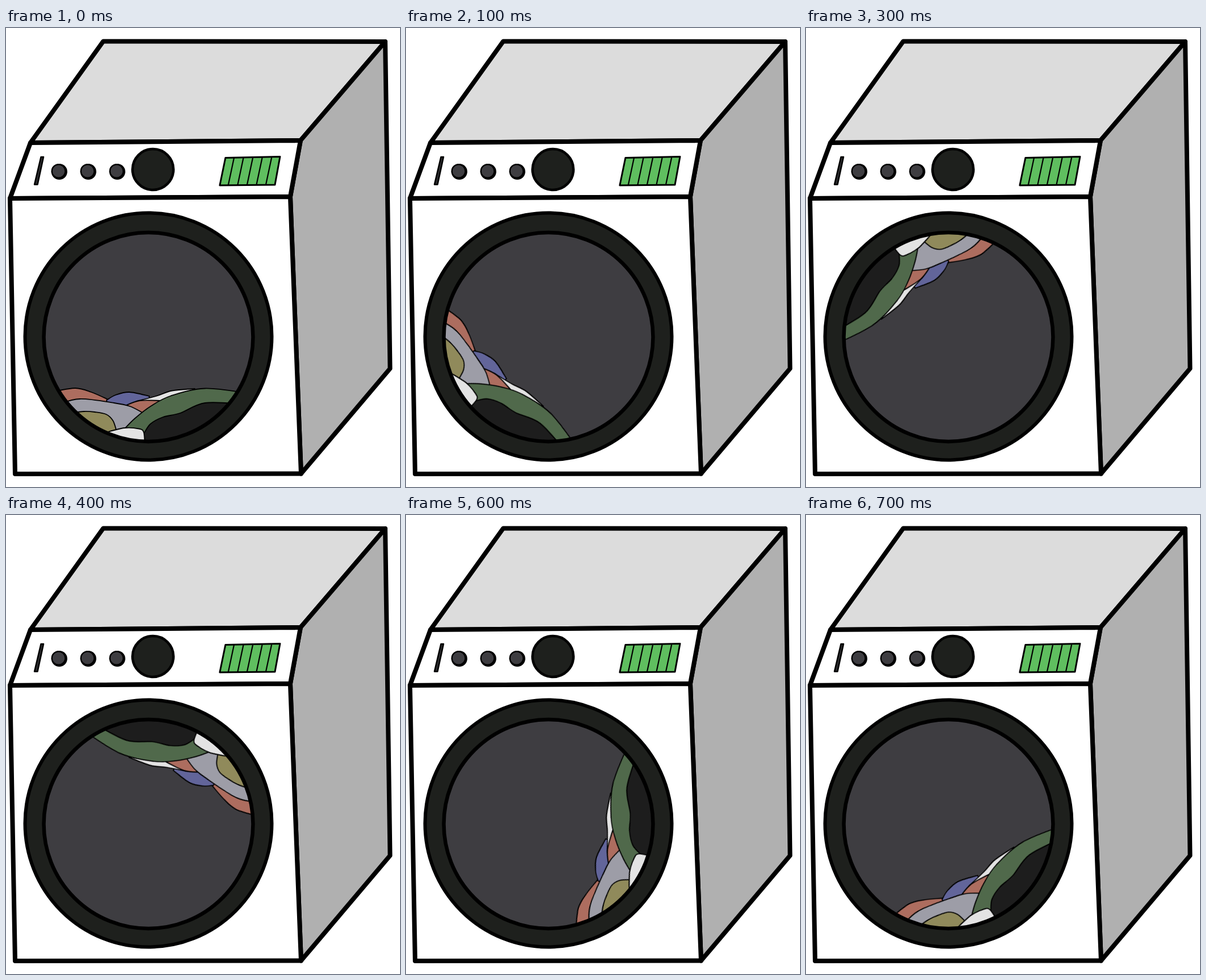
An HTML page for the animation above (0.8 s loop, 693 by 808 pixels).

```html
<!DOCTYPE html>
<html lang="en">
<head>
<meta charset="utf-8">
<title>Washing machine</title>
<style>
  html, body { margin: 0; width: 100%; height: 100%; overflow: hidden; background: #fff; }
  svg { display: block; width: 100%; height: 100%; }
  #pile { transform-origin: 250.5px 544px; }
</style>
</head>
<body>
<svg viewBox="0 0 693 808" stroke="#000" stroke-linejoin="round" stroke-linecap="round">
  <clipPath id="drum"><circle cx="250.5" cy="544" r="185"/></clipPath>
  <g id="box" stroke-width="8"></g>
  <path fill="#2b2b2d" stroke-width="2.5" d="M61.5 227H66L55.5 275.5H50Z"/>
  <g id="knobs"></g>
  <circle cx="258.5" cy="249" r="36" fill="#1e201d" stroke-width="4.5"/>
  <path fill="#5fbe5f" stroke-width="3" d="M386 228.5L482 226.5L473 276L376 277Z"/>
  <g id="bars" stroke-width="2.2"></g>
  <ellipse cx="250.5" cy="543" rx="217" ry="217.5" fill="#1e201d" stroke-width="6"/>
  <circle cx="250.5" cy="544" r="184" fill="#3e3d41" stroke="none"/>
  <g clip-path="url(#drum)"><g id="pile" stroke-width="1.8"></g></g>
  <circle cx="250.5" cy="544" r="184" fill="none" stroke-width="6.5"/>
</svg>
<script>
const byId = id => document.getElementById(id);

function add(id, tag, attrs) {
  const el = document.createElementNS('http://www.w3.org/2000/svg', tag);
  for (const key in attrs) el.setAttribute(key, attrs[key]);
  byId(id).append(el);
}

// Corners of the machine, shared by its faces
const backLeft = [171, 23.5], backRight = [667, 24], backFoot = [675.5, 599.5];
const topLeft = [43, 202], topRight = [518, 198];
const frontLeft = [7, 300], frontRight = [500, 297];
const footLeft = [16, 785], footRight = [519, 784.5];

const face = (fill, ...corners) =>
  add('box', 'polygon', { fill, points: corners.join(' ') });
face('#dcdcdc', backLeft, backRight, topRight, topLeft);
face('#b0b0b0', backRight, backFoot, footRight, frontRight, topRight);
face('#fff', topLeft, topRight, frontRight, frontLeft);
face('#fff', frontLeft, frontRight, footRight, footLeft);

for (let i = 0; i < 3; i++) {
  const x = 93 + 51 * i;
  add('knobs', 'circle', { cx: x + 0.8, cy: 253, r: 14, stroke: 'none' });
  add('knobs', 'circle', { cx: x - 0.5, cy: 252, r: 11.8, fill: '#3e3d41', 'stroke-width': 2.4 });
}

for (let i = 0; i < 5; i++) {
  const x = 401 + 16.5 * i;
  add('bars', 'path', { d: `M${x} 229l-10 47` });
}

// Smooth ridge through a few points
function ridge(p) {
  const at = i => p[Math.max(0, Math.min(p.length - 1, i))];
  let d = 'M' + p[0];
  for (let i = 0; i < p.length - 1; i++) {
    const [a, b, c, e] = [at(i - 1), at(i), at(i + 1), at(i + 2)];
    const c1 = b.map((v, k) => v + (c[k] - a[k]) / 6);
    const c2 = c.map((v, k) => v - (e[k] - b[k]) / 6);
    d += `C${c1} ${c2} ${c}`;
  }
  return d;
}

// Each cloth hangs straight down from its ridge and hides those behind it
function cloth(fill, ...points) {
  add('pile', 'path', { fill, d: ridge(points) + `V760H${points[0][0]}Z` });
}
const red = '#ad6d5f', white = '#e3e3e3';
cloth(red, [84, 640], [122, 634], [150, 641], [184, 656]);
cloth('#62659a', [177, 655], [193, 646], [217, 641], [252, 648]);
cloth(white, [229, 657], [264, 648], [292, 638.5], [332, 635]);
cloth(red, [207, 666], [235, 656], [272, 656]);
cloth('#9d9da7', [90, 663], [130, 653], [190, 660], [218, 666], [240, 677]);
cloth('#908a5b', [110, 678], [137, 675], [156, 676], [176, 680], [188, 691], [194, 708]);
cloth('#50694b', [208, 706], [227, 687], [255, 665.5], [290, 647.5], [350, 634.5], [425, 643]);
cloth('#1d1d1d', [242, 715], [254, 697], [276, 685], [306, 678], [350, 660], [415, 662]);
cloth(white, [172, 713], [208, 704], [234, 705.5], [242, 711], [244, 728]);

// Drum angle in degrees, held for 100 ms each
const angles = [0, 46, 91.7, 146.7, 205.7, 246, 285.4, 331.3];
const turn = a => ({ transform: `rotate(${a}deg)`, easing: 'steps(1, end)' });
byId('pile').animate(
  [...angles, 360].map(turn),
  { duration: angles.length * 100, iterations: Infinity }
);
</script>
</body>
</html>
```
